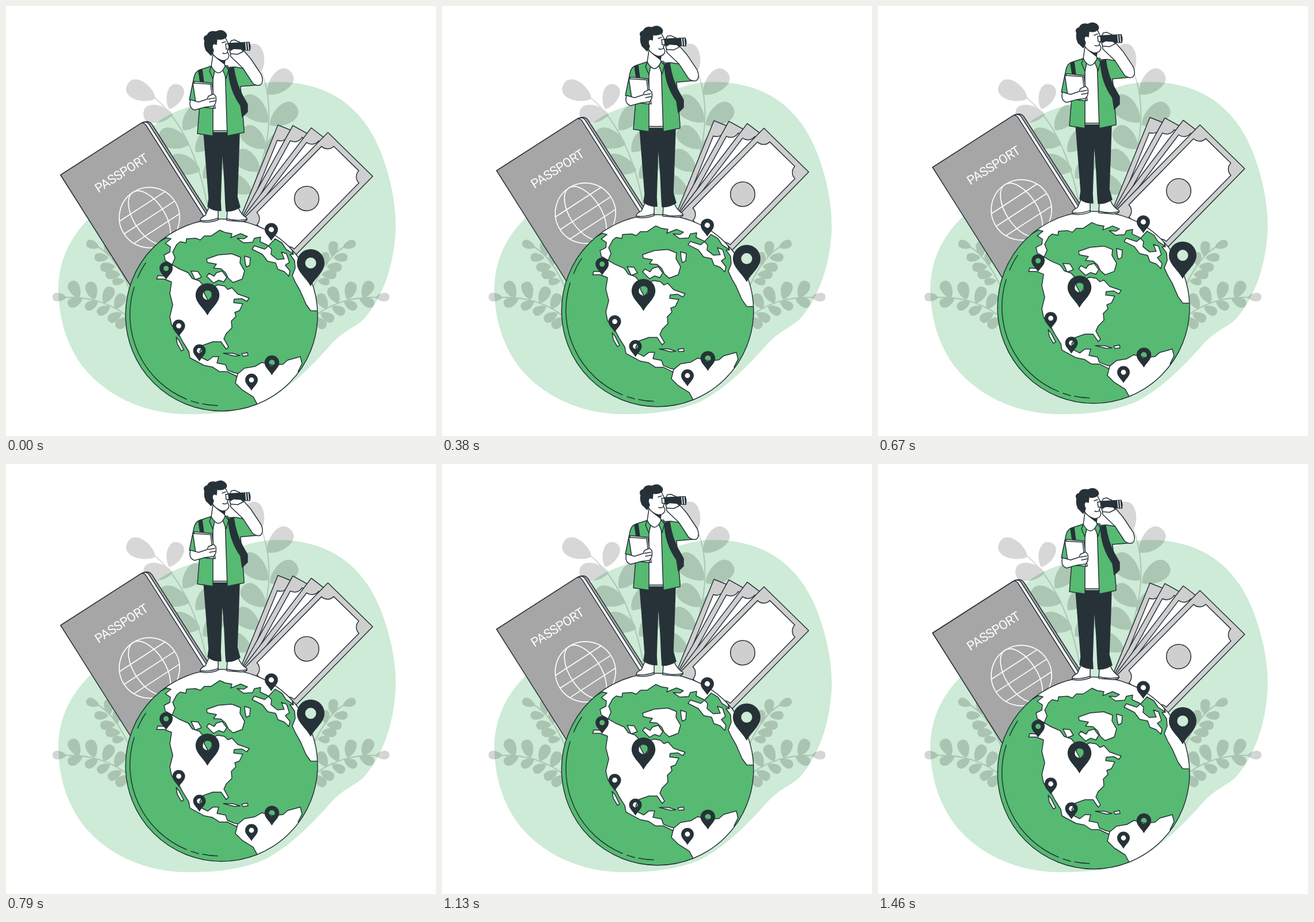
Animation of 748 by 748 pixels, one loop 1.5 s. Source, as an HTML page:

```html
<!DOCTYPE html>
<html lang="en">
<head>
<meta charset="utf-8">
<title>Travel</title>
<style>
html, body { margin: 0; width: 100%; height: 100%; overflow: hidden; background: #fff; }
svg { display: block; width: 100vw; height: 100vh; }
.line { stroke: #263238; stroke-width: 1.5; stroke-linejoin: round; stroke-linecap: round; }
.none { fill: none; }
.dark { fill: #263238; }
.green { fill: #56ba72; }
.white { fill: #fff; }
.grey { fill: #a6a6a6; }
.pale { fill: #cfcfcf; }
.plant { opacity: .16; }
.stem { fill: none; stroke: #000; stroke-width: 2; }
.title { font: 22px Roboto, sans-serif; font-stretch: 75%; letter-spacing: -.3px; fill: #fff; text-anchor: middle; }
</style>
</head>
<body>
<svg viewBox="0 0 748 748">
  <defs>
    <path id="leaf" d="M0 0C.2-.32 1-.5 1 0S.2.32 0 0"/>
    <path id="pin" class="dark" fill-rule="evenodd" d="M0 1.7C-.3 1.1-1 .65-1 0A1 1 0 0 1 1 0C1 .65.3 1.1 0 1.7ZM-.4 0A.4.4 0 0 0 .4 0A.4.4 0 0 0-.4 0Z"/>
    <g id="bill" class="line">
      <path class="pale" d="M0 0H109V212H0Z"/>
      <path class="white" d="M9 25A15 15 0 0 0 24 10H85A15 15 0 0 0 100 25V186A15 15 0 0 0 85 201H24A15 15 0 0 0 9 186Z"/>
      <circle class="pale" cx="54" cy="108" r="21.3"/>
    </g>
    <clipPath id="disc"><circle cx="375" cy="537.5" r="167"/></clipPath>
  </defs>

  <path fill="#cdebd6" d="M262 204C300 172 350 172 395 150C435 130 480 128 520 137C585 150 632 195 656 265C672 310 678 350 678 385C676 445 658 505 622 545C606 560 588 564 566 588C530 628 495 664 452 687C410 706 360 711 310 710C235 708 170 675 132 625C103 585 92 540 91 495C91 445 110 405 142 372C190 325 205 250 262 204Z"/>

  <g class="plant" data-leaves="260 161 211 137,284 179 301 137,290 189 239 187,308 216 340 176,319 241 266 223,330 254 362 218,338 286 284 269,343 300 375 265">
    <path class="stem" d="M258 159Q325 215 350 345"/>
  </g>
  <g class="plant" data-leaves="444 114 425 67,455 154 495 114,456 202 411 160,459 207 505 174,452 248 412 213,449 256 489 225,442 287 400 255,436 300 472 270,428 325 384 300">
    <path class="stem" d="M442 108Q474 185 440 288Q425 330 412 365"/>
  </g>
  <g id="sprigs" class="plant">
    <g data-leaves="162 420 140 411,180 436 178 409,178 438 154 437,192 452 193 428,190 453 164 455,199 467 173 467,206 478 185 480">
      <path class="stem" d="M158 418Q190 435 214 490"/>
    </g>
    <g data-leaves="105 507 81 506,127 508 113 479,133 509 108 520,154 511 145 480,160 514 138 526,170 517 184 489,181 523 159 535,190 527 204 501,201 534 178 547,213 542 192 559">
      <path class="stem" d="M100 507Q170 504 218 545"/>
    </g>
  </g>
  <use href="#sprigs" transform="matrix(-1 0 0 1 748 0)"/>

  <g id="float">
    <g class="line">
      <path class="grey" d="M95 294L237 203Q248 198 254 206L358 369L370 480H214Z"/>
      <path class="white" d="M237 203Q245 200 249 206L355 372H340Z"/>
      <path class="grey" d="M95 294L235 204Q240 202 244 208L348 372L330 500H225Z"/>
    </g>
    <text class="title" transform="translate(205 297) rotate(-32.7)">PASSPORT</text>
    <g fill="none" stroke="#fff" stroke-width="1.7" transform="translate(249.5 368) rotate(-33)">
      <circle r="52.5"/><ellipse rx="27" ry="52.5"/>
      <path d="M-52.5 0H52.5M-47-23H47M-47 23H47"/>
    </g>

    <use href="#bill" transform="translate(473 207) rotate(22)"/>
    <use href="#bill" transform="translate(499 208) rotate(29)"/>
    <use href="#bill" transform="translate(531 212) rotate(37.3)"/>
    <use href="#bill" transform="translate(560 220) rotate(44.4)"/>

    <circle class="green" cx="375" cy="537.5" r="167"/>
    <g class="line white" clip-path="url(#disc)">
      <path d="M250 420L279 403L287 405L277 413L286 419L285 428L275 433L277 443L289 450L294 438L290 428L297 415L303 410L313 412L314 405L330 404L338 407L345 400L357 400L372 390L381 394L393 396L391 403L408 396L420 401L414 405L402 404L413 412L429 411L432 404L443 402L442 410L455 416L462 423L461 432L472 441L484 440L479 428L488 431L493 446L486 451L494 461L492 470L484 462L473 458L469 447L455 444L446 432L428 423L432 417L450 423L457 417L468 405L480 412L487 423L499 431L497 421L520 400L480 340H300Z"/>
      <path d="M497 421L500 432L494 432L502 443L503 456L498 469L504 482L512 496L522 519L530 530L560 531V430L520 400Z"/>
      <path d="M349 440L369 433L393 431L408 437L407 447L415 461L411 475L395 481L387 474L382 464L374 457L361 456L366 449L350 446Z"/>
      <path d="M415 435L425 438L424 451L418 454L416 446Z"/>
      <path d="M366 464L376 461L384 472L379 480L370 477L361 482L349 470L353 465L362 470Z"/>
      <path d="M322 461L334 462L340 472L329 476Z"/>
      <path d="M262 475L264 469L280 470L289 450L301 457L317 464L324 474L336 478L345 488V500L352 513L358 505L359 490L368 485L380 487L386 493L393 490L403 501L423 508L419 514L410 509L397 510L396 516L412 518L406 530L398 533L400 540L392 548L393 560L383 570L379 579L387 593L383 597L374 584L360 584L343 590L337 601L341 612L351 617L360 610L370 610L367 621L382 624L385 633L397 638L407 640L401 644L385 636L371 636L359 628L344 625L320 612L318 601L308 585L300 570L288 555L285 540L290 520L285 500L288 480L275 475Z"/>
      <path d="M296 576L301 582L309 598L305 600L298 588Z"/>
      <path d="M378 604L394 604L407 608L398 609ZM410 605L420 603L421 608L412 609Z"/>
      <path d="M403 640L415 630L433 627L445 620L465 625L482 623L490 616L512 610L515 622L508 636L540 650L480 720H440L436 691L430 680L411 668L399 656Z"/>
    </g>
    <circle class="line none" cx="375" cy="537.5" r="167"/>
    <path class="line none" d="M243 447Q235 458 229 473M223 489A159 159 0 0 0 314 684M322 687L335 691M342 692Q355 695 368 695"/>

    <g class="line">
      <path class="white" d="M353 350L369 354V372Q354 378 338 375Q336 369 347 364ZM385 355L404 351Q409 363 419 369Q421 375 408 375L384 373Z"/>
      <path class="none" d="M338 373Q354 375 369 369M384 370Q402 375 419 371"/>
      <path class="dark" d="M344 220H406L404 280L402 332L407 350Q395 358 383 357L382 344L380 300L376 248L373 340L374 356Q361 357 351 349L353 335Z"/>
      <path class="white" d="M358 104H386V217H359Z"/>
      <path class="green" d="M359 104L337 111Q329 114 327 124L319 163L337 172L333 222L360 226V118Z"/>
      <path class="green" d="M381 107L398 106L416 109L442 137L408 140L414 214V220L385 226Z"/>
      <path class="green" d="M358 102L354 113L360 127L364 108ZM381 103L387 111L383 126L377 111Z"/>
      <path class="dark" d="M387 109L396 107Q400 135 411 155L420 171V184L411 193L408 173Q388 145 387 109ZM335 113L341 111L344 133H338Z"/>
      <path class="white" d="M327 131L358 134L364 178L332 173Z"/>
      <path class="white" d="M325 134L356 136L361 178L331 175Z"/>
      <path class="white" d="M321 163Q317 177 328 181L346 176L361 174Q367 169 365 157L361 153L352 157L350 162L335 167Z"/>
      <path class="none" d="M352 162L363 160M354 167L364 165"/>
      <path class="white" d="M361 78L357 105Q370 128 381 105L379 94Z"/>
      <path class="dark" d="M367 91L381 95L380 101Z"/>
      <path class="white" d="M363 58L381 54L386 64L388 73L385 79L388 86Q387 95 376 95Q366 92 360 84L357 70Z"/>
      <path class="dark" d="M357 86L348 77Q344 68 346 61Q342 53 350 51Q354 42 365 45Q374 40 380 45Q386 50 382 55Q375 60 367 57L366 67Q359 63 359 72L361 78Z"/>
      <path class="none" d="M377 82Q382 84 385 81M376 64L382 62"/>
      <path class="white" d="M390 78L402 74L413 77L426 92L444 119Q449 132 443 137Q437 140 429 134L412 108L391 88Z"/>
      <path class="white" d="M390 64L392 60L398 59L402 61L407 63V68H391Z"/>
      <path class="dark" d="M387 65L423 63Q426 70 424 77L388 76Z"/>
      <path class="white" d="M382 66H387L388 75H383Z"/>
      <path class="white" d="M389 78L396 74L409 75L413 79L403 84L391 83Z"/>
      <path stroke="#fff" d="M417 64L418 76M421 64L422 76"/>
    </g>
    <g id="pins"></g>
  </g>
</svg>
<script>
const leaf = (x, y, tipX, tipY) => {
  const dx = tipX - x, dy = tipY - y;
  return `<use href="#leaf" transform="matrix(${dx} ${dy} ${-dy} ${dx} ${x} ${y})"/>`;
};
for (const plant of document.querySelectorAll('[data-leaves]')) {
  plant.innerHTML += plant.dataset.leaves.split(',').map(s => leaf(...s.split(' ').map(Number))).join('');
}

// x, y, radius
const pins = [
  [530, 447, 24], [350.5, 503, 20.7], [278.5, 456.5, 11.5], [461.5, 389, 11.5],
  [300.5, 556.5, 11], [336.5, 599.5, 11], [462.5, 620.5, 12.8], [427, 650.5, 11]
];
document.getElementById('pins').innerHTML = pins
  .map(([x, y, r]) => `<use href="#pin" transform="translate(${x} ${y}) scale(${r})"/>`).join('');

const LOOP = 1500, MOVE = 1460, RISE = 14.5;
const floating = document.getElementById('float');
function draw() {
  const p = Math.min(1, performance.now() % LOOP / MOVE);
  const lift = RISE * (1 - Math.abs(1 - 2 * p));
  floating.setAttribute('transform', `translate(0 ${-lift})`);
  requestAnimationFrame(draw);
}
draw();
</script>
</body>
</html>
```
